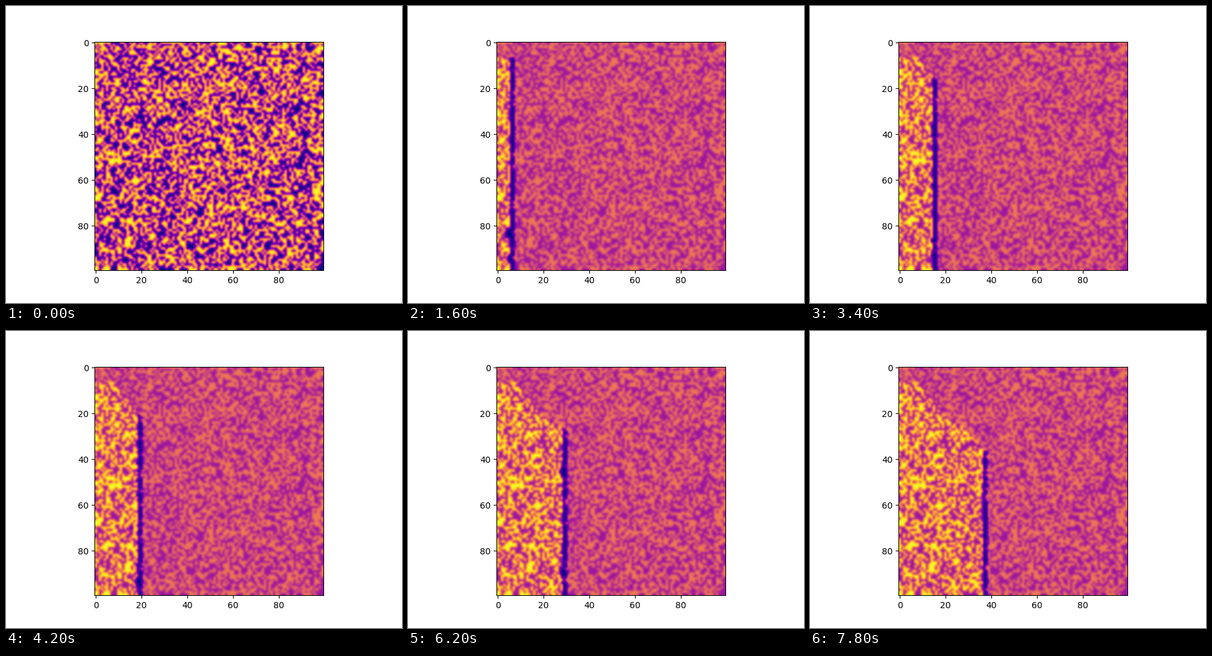
Write a matplotlib script that moves like this. It is 640 px wide and 480 px high and loops after 8000 ms.

```python
import numpy as np
import matplotlib.pyplot as plt
from matplotlib.animation import FuncAnimation

SIZE = 100
FRAMES = 40
EMPTY, TREE, FIRE, BURNT = 0, 1, -1, 2

rng = np.random.default_rng(7)
rows, cols = np.mgrid[0:SIZE, 0:SIZE]
forest = rng.integers(EMPTY, TREE + 1, (SIZE, SIZE))


def chance(p):
    return rng.random((SIZE, SIZE)) < p


def make_fire():
    """Steps at which each cell catches fire and goes out."""
    # The front moves right one column per step and burns two columns wide
    start = cols + 1 + chance(.15)
    stop = cols + 3 + chance(.04)

    # A few small patches burn for longer
    for r, c in zip(rng.integers(40, 96, 12), rng.integers(4, 38, 12)):
        stop[r:r + 4, c:c + 2] += rng.integers(1, 3)

    # Cells above this falling edge stay out of reach
    edge = np.interp(cols, [8, 19, 30, 37], [7, 21, 28, 37])
    safe = rows < np.round(edge)
    start[safe] = stop[safe] = FRAMES
    return start, stop


start, stop = make_fire()


def state_at(step):
    grid = forest.copy()
    grid[(start <= step) & (step < stop)] = FIRE
    grid[(step >= stop) & (forest == TREE)] = BURNT
    return grid


fig, ax = plt.subplots(figsize=(6.4, 4.8), dpi=100)
image = ax.imshow(forest, cmap="plasma", interpolation="bicubic")


def update(step):
    image.set_data(state_at(step))
    image.autoscale()
    return [image]


anim = FuncAnimation(fig, update, frames=FRAMES, interval=200,
                     repeat=True, repeat_delay=0)
plt.show()
```
